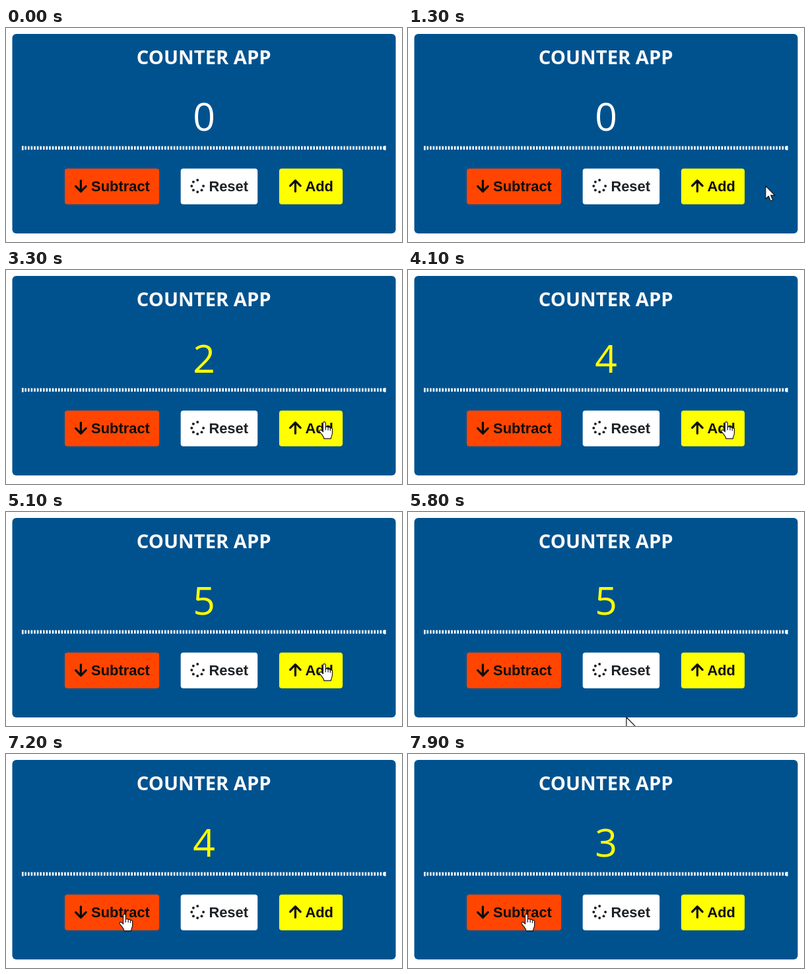
Animation, 600 px wide and 325 px high, one loop 8 s. Source, as an HTML page:

```html
<!DOCTYPE html>
<html lang="en">
<head>
<meta charset="utf-8">
<title>Counter app</title>
<style>
  html, body { margin: 0; width: 100%; height: 100%; overflow: hidden; background: #fff; }
  svg { display: block; width: 600px; height: 325px; }
  .title { font: 700 29.2px "Open Sans", sans-serif; fill: #fafafa; }
  .count { font: 400 58.9px "Open Sans", sans-serif; }
  .title, .count { text-anchor: middle; }
  .label { font: 700 21.9px "Liberation Sans", Arial, sans-serif; fill: #0c0c0c; }
  .icon { fill: none; stroke: #0c0c0c; stroke-width: 3.2; stroke-linecap: round; stroke-linejoin: round; }
  .cursor { fill: #fff; stroke: #111; stroke-width: 1.2; stroke-linejoin: round; }
</style>
</head>
<body>
<svg viewBox="0 0 600 325">
  <rect x="9.5" y="9" width="581" height="303" rx="6" fill="#00528f"/>
  <text class="title" x="299.7" y="54.8">COUNTER APP</text>
  <text class="count" id="count" x="300" y="155.6">0</text>

  <path d="M24 179h2.6v6.5H24zM573 179h2.6v6.5H573z" fill="#fff"/>
  <path d="M28.4 182.1H573" stroke="#fff" stroke-width="5.4" stroke-dasharray="2.6 2"/>

  <rect x="89" y="213.6" width="143.2" height="54.1" rx="4" fill="#ff4500"/>
  <path class="icon" d="M113.4 231.8V248M105.6 240.4l7.8 7.9 7.8-7.9"/>
  <text class="label" x="129.1" y="248">Subtract</text>

  <rect x="264.7" y="213.6" width="116.5" height="54.1" rx="4" fill="#fff"/>
  <g id="spinner" fill="#1c2126"></g>
  <text class="label" x="307.4" y="248" style="fill: #1c2126">Reset</text>

  <rect x="413.9" y="213.6" width="96.2" height="54.1" rx="4" fill="#ff0"/>
  <path class="icon" d="M438.4 248.2V232M430.6 239.6l7.8-7.9 7.8 7.9"/>
  <text class="label" x="453.4" y="248">Add</text>

  <path class="cursor" id="arrow" d="M0 0V19.5L4.5 15.4 7.6 22.8 11 21.3 7.9 14.2H14Z"/>
  <g class="cursor" id="hand">
    <g transform="scale(.95)">
      <path d="M-2 2C-2-.5 2-.5 2 2V9C2.4 7.2 5.7 7.2 6 9.5C6.6 8 9.3 8.2 9.5 10.6C10.3 9.4 12.7 9.8 12.8 12V18C12.8 21 11 23 10.5 27H-.5C-.8 24-2 23-3.5 21L-7.6 15.5C-8.6 13.7-6.2 12.2-4.6 13.6L-2 16Z"/>
      <path d="M2 9v4.5M6 9.8v4M9.5 11v3.5" fill="none"/>
    </g>
  </g>
</svg>
<script>
const LOOP = 8000, STEP = 100;
const get = id => document.getElementById(id);
const arrow = get("arrow"), hand = get("hand"), count = get("count");

const clamp = (v, lo, hi) => Math.min(hi, Math.max(lo, v));
const progress = (t, from, to) => clamp((t - from) / (to - from), 0, 1);
const mix = (a, b, k) => a + (b - a) * k;
const easeOut = (k, power) => 1 - (1 - k) ** power;
const smooth = k => k * k * (3 - 2 * k);

// Seven dots round the ring, the upper right place empty
for (let i = 0; i < 7; i++) {
  const a = i * Math.PI / 4;
  const dot = document.createElementNS("http://www.w3.org/2000/svg", "circle");
  dot.setAttribute("cx", 290.2 + 8.9 * Math.cos(a));
  dot.setAttribute("cy", 240 + 8.9 * Math.sin(a));
  dot.setAttribute("r", 2);
  get("spinner").append(dot);
}

// Evenly paced clicks, the first one a full interval after `from`
const clicks = (t, from, interval, max) => clamp(Math.floor((t - from) / interval), 0, max);
const valueAt = t => clicks(t, 1600, 580, 5) - clicks(t, 6400, 600, 2);

// Sweep in from the right to Add, then swing below the panel to Subtract
function pointerAt(t) {
  const enter = progress(t, 1000, 1700);
  const cross = progress(t, 5300, 6300);
  if (cross === 0) {
    return [mix(620, 482.3, easeOut(enter, 1.5)), mix(281, 230.5, easeOut(enter, 3))];
  }
  const k = smooth(cross);
  return [mix(482.3, 179.5, k), mix(230.5, 243, k) + 75 * Math.sin(Math.PI * cross)];
}

const buttons = [...document.querySelectorAll("rect[rx='4']")].map(r => r.getBBox());
const inside = (b, x, y) => x > b.x && x < b.x + b.width && y > b.y && y < b.y + b.height;

function draw(now) {
  const t = Math.floor(now % LOOP / STEP) * STEP;
  const value = valueAt(t);
  count.textContent = value;
  count.style.fill = value ? "#ff0" : "#fff";

  const [x, y] = pointerAt(t);
  const over = buttons.some(b => inside(b, x, y));
  arrow.style.display = over ? "none" : "";
  hand.style.display = over ? "" : "none";
  (over ? hand : arrow).setAttribute("transform", `translate(${x} ${y})`);
}

const start = performance.now();
function tick() {
  draw(performance.now() - start);
  requestAnimationFrame(tick);
}
tick();
</script>
</body>
</html>
```
